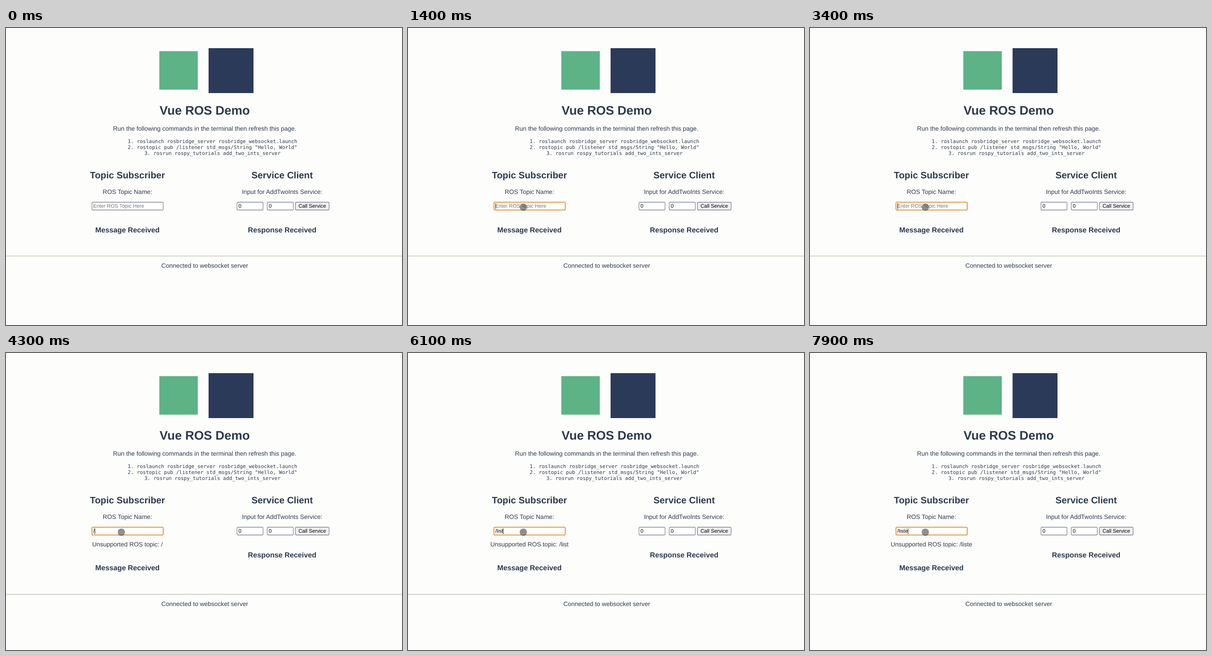
Write an HTML page that moves like this. It is 864 px wide and 648 px high and loops after 8 s.

```html
<!DOCTYPE html>
<html lang="en">
<head>
<meta charset="utf-8">
<title>Vue ROS Demo</title>
<style>
  html, body { margin: 0; width: 100%; height: 100%; overflow: hidden; background: #fdfdfc; }
  svg { display: block; width: 864px; height: 648px; }
  text { font: 13.5px "Liberation Sans", Arial, sans-serif; fill: #2c3a4d; text-anchor: middle;
    text-rendering: geometricPrecision; white-space: pre; }
  .h1 { font-size: 27px; font-weight: bold; }
  .h2 { font-size: 20.25px; font-weight: bold; }
  .h3 { font-size: 15.8px; font-weight: bold; }
  .code text { font: 10.97px "DejaVu Sans Mono", monospace; }
  .field { fill: #fff; stroke: #6f6d80; stroke-width: 1.1; }
  .button { fill: #efeff1; }
  .focused { stroke: #d8922f; stroke-width: 1.8; }
  .value { font-size: 11.25px; fill: #000; text-anchor: start; }
  .hint { fill: #757575; }
  .label { font-size: 11.25px; fill: #000; }
</style>
</head>
<body>
<svg viewBox="0 0 864 648">
  <rect x="334.5" y="50.5" width="84" height="84" fill="#5db286"/>
  <rect x="442" y="44" width="98" height="98" fill="#2c3a59"/>

  <text class="h1" x="433.6" y="189">Vue ROS Demo</text>
  <text x="433.6" y="224.3">Run the following commands in the terminal then refresh this page.</text>
  <g class="code">
    <text x="450.5" y="251.3">1. roslaunch rosbridge_server rosbridge_websocket.launch</text>
    <text x="450.5" y="264">2. rostopic pub /listener std_msgs/String "Hello, World"</text>
    <text x="450.5" y="276.7">3. rosrun rospy_tutorials add_two_ints_server</text>
  </g>

  <text class="h2" x="265" y="328.3">Topic Subscriber</text>
  <text x="265" y="362">ROS Topic Name:</text>
  <rect id="topic" class="field" x="187.6" y="380.1" width="155.4" height="17" rx="2"/>
  <text id="typed" class="value" x="190.3" y="392.4"></text>
  <rect id="caret" y="382.5" width="1" height="12.5"/>
  <text id="error" x="265" y="422"></text>

  <text class="h2" x="602.5" y="328.3">Service Client</text>
  <text x="602.5" y="362">Input for AddTwoInts Service:</text>
  <rect class="field" x="504" y="380.1" width="56.8" height="17" rx="2"/>
  <text class="value" x="507.2" y="392.4">0</text>
  <rect class="field" x="570" y="380.1" width="56.8" height="17" rx="2"/>
  <text class="value" x="573.2" y="392.4">0</text>
  <rect class="field button" x="631.5" y="380.1" width="73.5" height="17" rx="2"/>
  <text class="label" x="668.2" y="392.4">Call Service</text>
  <text class="h3" x="602.5" y="445.6">Response Received</text>

  <g id="lower">
    <text class="h3" x="265" y="445.6">Message Received</text>
    <text x="433.6" y="523">Connected to websocket server</text>
  </g>
  <rect id="rule" width="864" height="1"/>
  <circle id="pointer" r="8" fill="#464646" fill-opacity=".6"/>
</svg>
<script>
  const LOOP = 8000, FOCUS = 1100, SHIFT = 28.7;
  // time, x, y
  const path = [[400, 133, 487], [800, 223, 414], [1100, 251.6, 391]];
  // time, field value
  const keys = [[4200, "/"], [4700, "/l"], [5100, "/li"], [5500, "/lis"], [5800, "/list"], [7500, "/liste"]];

  const el = id => document.getElementById(id);
  const [topic, typed, caret, error, lower, rule, pointer] =
    ["topic", "typed", "caret", "error", "lower", "rule", "pointer"].map(el);
  const show = (node, on) => node.setAttribute("visibility", on ? "visible" : "hidden");

  function pointerAt(t) {
    const next = path.findIndex(p => p[0] > t);
    if (next < 0) return path[path.length - 1].slice(1);
    const a = path[next - 1], b = path[next];
    const k = (t - a[0]) / (b[0] - a[0]);
    return [a[1] + (b[1] - a[1]) * k, a[2] + (b[2] - a[2]) * k];
  }

  function draw(t) {
    const [since, value] = keys.filter(k => k[0] <= t).pop() || [FOCUS, ""];
    const focused = t >= FOCUS;

    topic.classList.toggle("focused", focused);
    typed.textContent = value || "Enter ROS Topic Here";
    typed.classList.toggle("hint", !value);
    caret.setAttribute("x", value ? 190.3 + typed.getComputedTextLength() : 190.8);
    show(caret, focused && (t - since) % 1000 < 500);

    error.textContent = value && "Unsupported ROS topic: " + value;
    lower.setAttribute("transform", `translate(0 ${value ? SHIFT : 0})`);
    rule.setAttribute("y", value ? 526 : 497);
    rule.setAttribute("fill", value ? "#aaab9d" : "#b0b693");

    const visible = t >= path[0][0];
    show(pointer, visible);
    if (visible) {
      const [x, y] = pointerAt(t);
      pointer.setAttribute("cx", x);
      pointer.setAttribute("cy", y);
    }
  }

  function tick() {
    draw(performance.now() % LOOP);
    requestAnimationFrame(tick);
  }
  tick();
</script>
</body>
</html>
```
